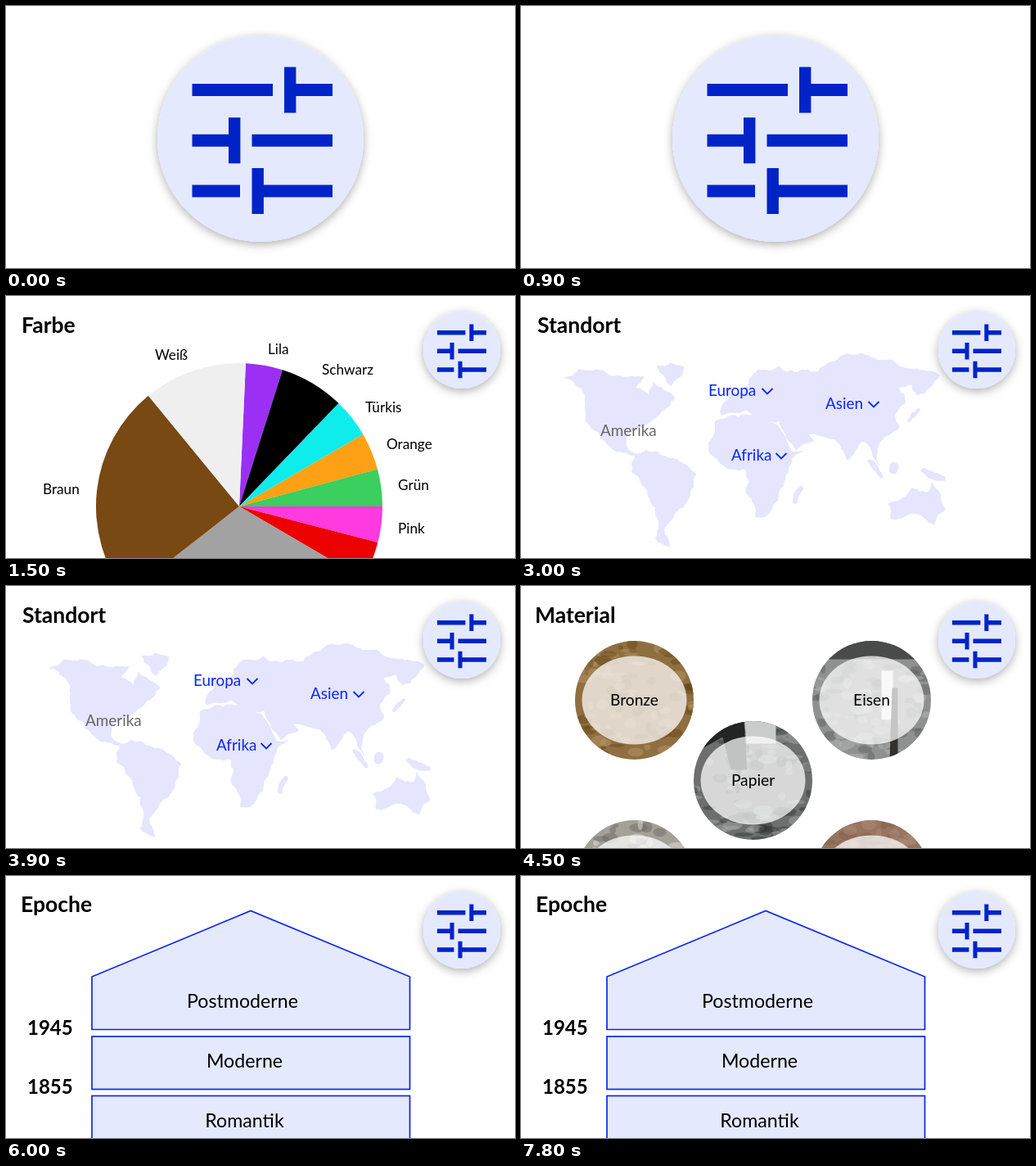
These frames come from a looping animation (622 px wide and 320 px high, 9 s). An HTML page:

```html
<!DOCTYPE html>
<html lang="de">
<head>
<meta charset="utf-8">
<title>Filter</title>
<style>
  html, body { margin: 0; width: 100%; height: 100%; overflow: hidden; background: #fff; }
  svg { display: block; width: 622px; height: 320px; font-family: Lato, sans-serif; }
  .slide, #button { visibility: hidden; }
  .on { visibility: visible !important; }
  .title { font-size: 26.5px; font-weight: 700; }
  .label { font-size: 17.2px; }
  .mid { text-anchor: middle; }
  .place { font-size: 18.9px; fill: #0a28ee; }
  #map { fill: #e5e5fe; stroke: #e5e5fe; stroke-linejoin: round; }
  .chevron { fill: none; stroke: #0a28ee; stroke-width: 1.8; }
  .epoch { fill: #e5e9fe; stroke: #0a28ee; stroke-width: 1.7; }
</style>
</head>
<body>
<svg viewBox="0 0 622 320">
  <defs>
    <filter id="shadow" x="-30%" y="-30%" width="160%" height="160%">
      <feDropShadow dx="0" dy="3" stdDeviation="6" flood-opacity=".32"/>
    </filter>
    <clipPath id="disc"><circle r="72.5"/></clipPath>
    <path id="bars" fill="#0023c8"/>
  </defs>

  <g class="slide">
    <circle cx="311" cy="162" r="126" fill="#e5e9fe" filter="url(#shadow)"/>
    <use href="#bars"/>
  </g>

  <g class="slide" id="colours"><text class="title" x="19" y="45">Farbe</text></g>

  <g class="slide">
    <g id="map"></g>
    <text class="title" x="20" y="45">Standort</text>
    <text class="place" x="97" y="171" style="fill:#666">Amerika</text>
    <g id="places"></g>
  </g>

  <g class="slide" id="materials"><text class="title" x="17" y="45">Material</text></g>

  <g class="slide">
    <text class="title" x="18" y="44">Epoche</text>
    <path class="epoch" d="M105 187.5V123L299 42.5 493.5 123v64.5z"/>
    <rect class="epoch" x="105" y="196" width="388.5" height="64.5"/>
    <rect class="epoch" x="105" y="268.5" width="388.5" height="64.5"/>
    <g class="mid" font-size="23.2">
      <text x="289" y="161">Postmoderne</text>
      <text x="291.5" y="234">Moderne</text>
      <text x="291.5" y="307">Romantik</text>
    </g>
    <g font-size="24" font-weight="700">
      <text x="26" y="194">1945</text>
      <text x="26" y="266">1855</text>
    </g>
  </g>

  <g id="button">
    <circle cx="557" cy="66" r="47" fill="#e5e9fe" filter="url(#shadow)"/>
    <use href="#bars" transform="translate(447.3 7.2) scale(.35 .366)"/>
  </g>
</svg>
<script>
const $ = id => document.getElementById(id);
const add = (id, markup) => $(id).insertAdjacentHTML('beforeend', markup);

let seed = 7;
const random = () => (seed = seed * 16807 % 2147483647) / 2147483647;

// Slider icon: left bar end, handle, right bar start
const sliders = [[326, 340, 340], [272, 272, 300.5], [286, 300.5, 300.5]];
$('bars').setAttribute('d', sliders.map(([left, handle, right], i) => {
  const y = 95 + 61.8 * i;
  return `M227.5 ${y}H${left}v15H227.5zM${right} ${y}H399v15H${right}zM${handle} ${y - 20.6}h14.4v56h-14.4z`;
}).join(''));

// Pie: end angle clockwise from the top, colour, label and its position
const slices = [
  [17.6, '#9b30f4', 'Lila', 320, 71], [44, '#000', 'Schwarz', 386, 96],
  [59.8, '#0eecec', 'Türkis', 439, 142], [74.9, '#ffa114', 'Orange', 465, 187],
  [90, '#3acf5e', 'Grün', 479, 237], [104.6, '#ff3adf', 'Pink', 479, 290],
  [120.3, '#ec0000'], [232, '#a2a2a2'],
  [320.6, '#784913', 'Braun', 45, 242], [362.6, '#efefef', 'Weiß', 182, 78]
];
const rim = deg => {
  const a = deg * Math.PI / 180;
  return `${285 + 175 * Math.sin(a)} ${257 - 175 * Math.cos(a)}`;
};
let start = 2.6;
for (const [end, colour, name = '', x = 0, y = 0] of slices) {
  add('colours', `<path fill="${colour}" d="M285 257L${rim(start)}A175 175 0 0 1 ${rim(end)}z"/>
    <text class="label" x="${x}" y="${y}">${name}</text>`);
  start = end;
}

// Coastline between two points by midpoint displacement
function coast([x1, y1], [x2, y2]) {
  const dx = x2 - x1, dy = y2 - y1;
  if (Math.hypot(dx, dy) < 5) return [[x1, y1]];
  const bend = (random() - .5) * .3;
  const mid = [(x1 + x2) / 2 - dy * bend, (y1 + y2) / 2 + dx * bend];
  return [...coast([x1, y1], mid), ...coast(mid, [x2, y2])];
}
function land(outline, width = 1) {
  const points = outline.split(' ').map(p => p.split(',').map(Number));
  const shore = points.flatMap((p, i) => coast(p, points[(i + 1) % points.length]));
  add('map', `<polygon points="${shore.join(' ')}" stroke-width="${width}"/>`);
}
// Americas and Greenland
land('53,101 92,90 150,98 140,112 156,121 162,105 188,124 152,158 130,168 128,183 144,196 105,181 79,150 74,113');
land('166,86 199,87 184,109');
land('140,193 166,190 214,218 205,247 174,286 182,306 164,296 158,248 135,214');
// Africa
land('237,154 276,145 312,157 331,190 344,189 322,226 299,269 287,270 275,212 243,204 229,180');
// Europe and Asia
land('245,145 247,132 272,116 290,90 384,80 511,97 484,121 478,108 461,112 469,131 457,144 462,160 440,177 437,207 418,177 398,200 384,175 349,168 358,176 336,188 316,152 276,139');
// Australia and islands
land('449,254 478,234 497,240 502,228 518,260 505,279 478,265 452,272');
land('342,235 335,251', 6);
land('253,114 257,123', 5);
land('486,139 474,152', 4);
land('426,202 440,220', 5);
land('456,208 455,212', 11);
land('492,213 516,223', 6);

for (const [name, x, y, tip] of [['Europa', 229, 122, 301], ['Asien', 372, 138, 431], ['Afrika', 257, 201, 318]])
  add('places', `<text class="place" x="${x}" y="${y}">${name}</text>
    <path class="chevron" d="M${tip - 6.5} ${y - 9}l6.5 6.5 6.5-6.5"/>`);

// Material discs: name, centre, base, light and dark tone, extra shapes
const discs = [
  ['Bronze', 138.5, 139.5, '#8f6f40', '#b89a6a', '#654618', ''],
  ['Eisen', 428.5, 139.5, '#8f9190', '#b9bbba', '#5c5e5d',
    '<path fill="#484b49" d="M-73-73H73v23H-73z"/><path fill="#e8e9e8" d="M12-36h14v60H12z"/><path fill="#33302d" d="M25-15h7V73h-10z"/>'],
  ['Papier', 283.5, 237.5, '#6c6f6d', '#a9acab', '#303331',
    '<path fill="#222523" d="M-73-73h62l4 60h-20l-10-40-36 20z"/><path fill="#c9cccb" d="M-10-73h38v28h-36z"/>'],
  ['', 138.5, 358.5, '#a3a198', '#e6e5de', '#67655d', ''],
  ['', 428.5, 358.5, '#977561', '#ad8e7c', '#7d5c48', '']
];
const blotch = tone => {
  const a = random() * 6.3, r = 75 * Math.sqrt(random());
  return `<ellipse cx="${r * Math.cos(a)}" cy="${r * Math.sin(a)}" rx="${3 + 9 * random()}" ry="${2 + 5 * random()}" fill="${tone}" opacity=".45"/>`;
};
for (const [name, x, y, base, light, dark, extra] of discs) {
  const blotches = Array.from({ length: 90 }, (_, i) => blotch(i % 2 ? light : dark)).join('');
  add('materials', `<g transform="translate(${x} ${y})">
    <g clip-path="url(#disc)"><circle r="73" fill="${base}"/>${blotches}${extra}</g>
    <ellipse rx="64" ry="54" fill="#fff" opacity=".72"/>
    <text class="mid" font-size="19.2" y="6.5">${name}</text></g>`);
}

const slides = document.querySelectorAll('.slide');
function draw() {
  const now = Math.min(4, Math.floor(performance.now() % 9000 / 1500));
  slides.forEach((slide, i) => slide.classList.toggle('on', i === now));
  $('button').classList.toggle('on', now > 0);
  requestAnimationFrame(draw);
}
draw();
</script>
</body>
</html>
```
